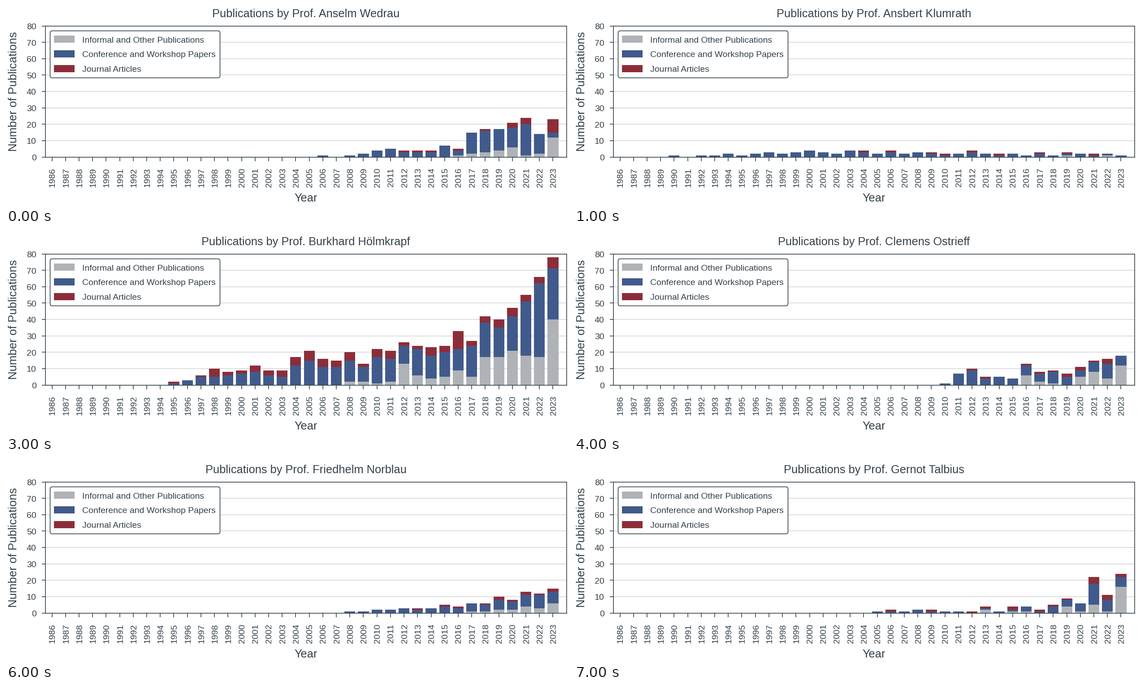
Write a matplotlib script that moves like this. It is 1254 px wide and 447 px high and loops after 8 s.

```python
import numpy as np
import matplotlib.pyplot as plt
from matplotlib.animation import FuncAnimation
from matplotlib.patches import FancyBboxPatch, Rectangle

W, H, DPI = 1254, 447, 100
DARK, GRID = "#32414b", "#d1d4d7"
GRAY, BLUE, RED = "#afb3b7", "#415a8c", "#8d2d39"
YEARS = np.arange(1986, 2024)
LEFT, RIGHT, TOP, BOTTOM = 87.5, 1250.5, 44.5, 337.5
X0, STEP = 102.5, 30.216
SMALL, LARGE = 19.4, 25.4

plt.rcParams.update({"font.family": "Liberation Sans", "text.color": DARK})


def pt(px):
    return px * 72 / DPI


charts = []


def chart(name, other, papers, journal):
    """Each series ends in 2023; earlier years are zero."""
    rows = [[0] * (len(YEARS) - len(s)) + s for s in (other, papers, journal)]
    charts.append(("Publications by Prof. " + name, np.array(rows)))


chart("Anselm Wedrau",
      [1, 2, 3, 4, 6, 1, 2, 12],
      [1, 0, 1, 2, 4, 5, 3, 3, 3, 7, 3, 13, 13, 13, 12, 19, 12, 3],
      [1, 1, 1, 0, 1, 0, 1, 0, 3, 4, 0, 8])
chart("Ansbert Klumrath",
      [1, 0, 0, 1, 0],
      [1, 0, 1, 1, 2, 1, 2, 3, 2, 3, 4, 3, 2, 4, 3, 2, 3,
       2, 3, 2, 1, 2, 3, 2, 1, 2, 1, 2, 1, 1, 2, 1, 1, 1],
      [1, 0, 1, 0, 0, 1, 1, 0, 1, 0, 1, 0, 0, 1, 0, 1, 0, 1, 0, 0])
chart("Ansgar Prulk",
      [1] + [0] * 13 + [3, 2, 8, 0, 8],
      [4, 0, 3, 0, 3, 0, 2, 2, 1, 5, 6, 5, 7, 5, 10, 16, 18, 12, 16, 10,
       16, 12, 11, 12, 8, 15, 11, 11, 8, 7, 12, 7, 10, 12, 10],
      [1, 0, 0, 0, 0, 0, 1, 1, 0, 1, 1, 1, 2, 1, 1, 3, 0, 2, 2, 3,
       5, 11, 9, 2, 7, 7, 3, 2, 2, 1, 3, 0, 1, 3, 1])
chart("Burkhard Hölmkrapf",
      [2, 2, 1, 2, 13, 6, 4, 5, 9, 5, 17, 17, 21, 18, 17, 40],
      [1, 3, 5, 5, 6, 7, 8, 6, 5, 12, 15, 11, 11, 13, 9, 16, 14,
       11, 16, 14, 15, 13, 19, 21, 18, 21, 33, 45, 31],
      [1, 0, 1, 5, 2, 2, 4, 3, 4, 5, 6, 5, 4, 5, 2, 5, 5,
       2, 2, 5, 4, 11, 3, 4, 5, 5, 4, 4, 7])
chart("Clemens Ostrieff",
      [6, 2, 1, 0, 5, 8, 4, 12],
      [1, 7, 9, 4, 5, 4, 6, 5, 7, 5, 4, 6, 9, 6],
      [1, 1, 0, 0, 1, 1, 1, 2, 2, 1, 3, 0])
chart("Albiona Vrethomaj",
      [2, 1, 2, 3, 2, 4, 6, 5, 7],
      [1, 0, 0, 0, 0, 0, 1, 1, 2, 5, 3, 10, 8, 18, 10, 18, 14, 16, 13],
      [1, 0, 0, 0, 0, 2, 4, 1, 0, 0, 2, 7, 5])
chart("Friedhelm Norblau",
      [1, 1, 2, 2, 4, 3, 6],
      [1, 1, 2, 2, 3, 2, 3, 4, 3, 5, 4, 6, 5, 7, 8, 7],
      [1, 0, 1, 1, 0, 1, 2, 1, 2, 1, 2])
chart("Gernot Talbius",
      [2, 0, 1, 1, 0, 0, 4, 1, 5, 1, 16],
      [1, 1, 1, 2, 1, 1, 1, 0, 1, 1, 1, 3, 1, 4, 4, 5, 13, 7, 6],
      [1, 0, 0, 1, 0, 0, 1, 1, 0, 2, 0, 1, 1, 1, 0, 4, 3, 2])

fig = plt.figure(figsize=(W / DPI, H / DPI), dpi=DPI, facecolor="white")
ax = fig.add_axes([LEFT / W, 1 - BOTTOM / H,
                   (RIGHT - LEFT) / W, (BOTTOM - TOP) / H])
ax.set_xlim(1986 + (LEFT - X0) / STEP, 1986 + (RIGHT - X0) / STEP)
ax.set_ylim(0, 80)
ax.set_xticks(YEARS)
ax.set_yticks(range(0, 81, 10))
ax.tick_params(length=pt(8.5), width=pt(1.6), color=DARK,
               labelleft=False, labelbottom=False)
ax.set_axisbelow(True)
ax.grid(axis="y", color=GRID, lw=pt(1.5))
for spine in ax.spines.values():
    spine.set(color=DARK, linewidth=pt(1.6))

bars = [ax.bar(YEARS, 0 * YEARS, width=0.8, color=c, lw=0)
        for c in (GRAY, BLUE, RED)]

# Overlay in pixel units, y pointing down.
page = fig.add_axes([0, 0, 1, 1], zorder=5)
page.set(xlim=(0, W), ylim=(H, 0))
page.axis("off")


def label(x, y, text, size=SMALL, ha="left", rotation=0):
    return page.text(x, y, text, fontsize=pt(size), ha=ha, va="baseline",
                     rotation=rotation, rotation_mode="anchor")


for value in range(0, 81, 10):
    y = BOTTOM - value * (BOTTOM - TOP) / 80
    label(67.5, y + 7.5, str(value), ha="right")
for i, year in enumerate(YEARS):
    label(X0 + i * STEP + 6.5, 383, str(year), ha="center", rotation=90)
label(669, 437, "Year", LARGE, "center")
label(24.5, 191.5, "Number of Publications", 25.9, "center", 90)
title = label(669, 25, "", LARGE, "center")

page.add_patch(FancyBboxPatch((98.5, 55.5), 379, 105,
                              boxstyle="round,pad=0,rounding_size=4.5",
                              fc="white", ec=DARK, lw=pt(1.6)))
legend = [("Informal and Other Publications", GRAY),
          ("Conference and Workshop Papers", BLUE),
          ("Journal Articles", RED)]
for i, (text, color) in enumerate(legend):
    y = 66 + 32.8 * i
    page.add_patch(Rectangle((107, y), 46, 16, fc=color, lw=0))
    label(169.5, y + 15.5, text)


def draw(i):
    name, rows = charts[i]
    title.set_text(name)
    base = np.zeros(len(YEARS))
    for group, heights in zip(bars, rows):
        for bar, y, h in zip(group, base, heights):
            bar.set(y=y, height=h)
        base = base + heights
    return [title]


anim = FuncAnimation(fig, draw, frames=len(charts), interval=1000,
                     repeat=True, repeat_delay=0, blit=False)
plt.show()
```
